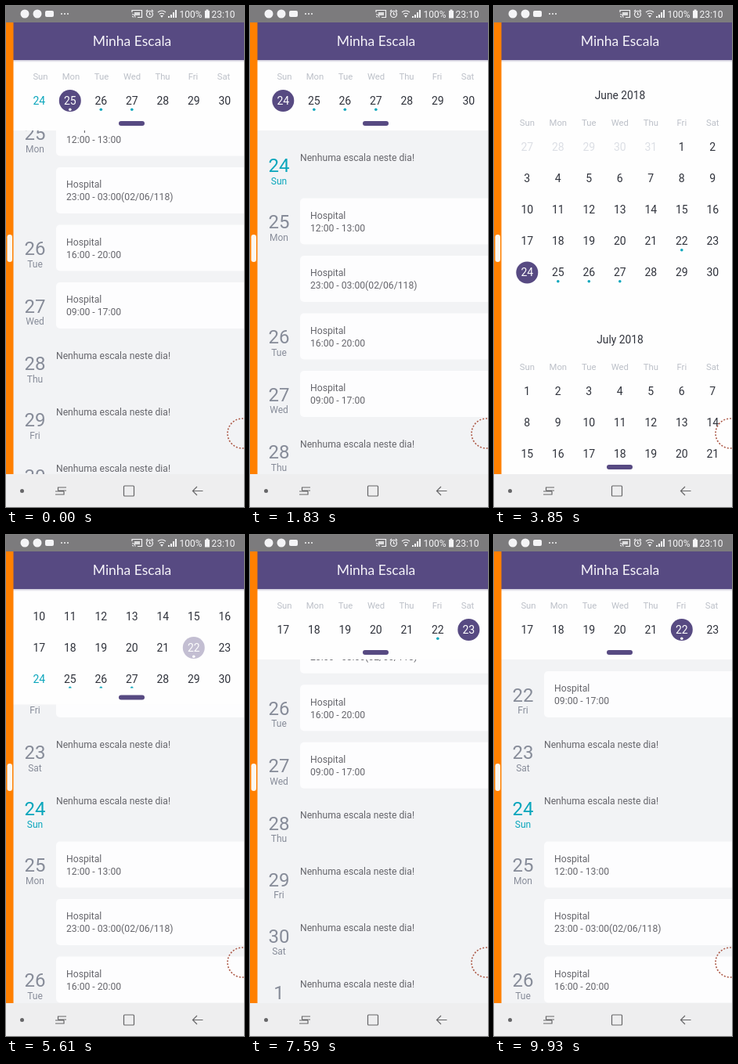
These frames come from a looping animation (304 by 640 pixels, 9.98 s). An HTML page:

```html
<!DOCTYPE html>
<html lang="pt">
<head>
<meta charset="utf-8">
<title>Minha Escala</title>
<style>
html, body { margin: 0; width: 100%; height: 100%; overflow: hidden; background: #f2f3f5; }
svg { display: block; width: 304px; height: 640px; font-family: Roboto, "Noto Sans", sans-serif; }
.icon { fill: none; stroke: #f4f4f6; stroke-width: 1.2; }
.nav { fill: none; stroke: #666668; stroke-width: 1.2; }
</style>
</head>
<body>
<svg id="stage" viewBox="0 0 304 640" xmlns="http://www.w3.org/2000/svg">
  <defs>
    <clipPath id="calendarClip"><rect id="clipRect" x="9" y="69" width="295" height="69"/></clipPath>
    <linearGradient id="shade" x2="0" y2="1">
      <stop stop-color="#574a82" stop-opacity=".3"/>
      <stop offset="1" stop-color="#574a82" stop-opacity="0"/>
    </linearGradient>
  </defs>
  <rect width="304" height="640" fill="#f2f3f5"/>
  <g id="list"></g>
  <rect id="panel" x="9" y="69" width="295" height="90" fill="#fefefe"/>
  <g clip-path="url(#calendarClip)"><g id="calendar"></g></g>
  <g id="weekdays"><rect x="9" y="69" width="295" height="34" fill="#fefefe"/></g>
  <rect id="knob" x="144" width="33" height="6" rx="3" fill="#574a82"/>
  <circle cx="302" cy="546" r="19" fill="none" stroke="#b0604f" stroke-width="1.700" stroke-dasharray="2 2"/>

  <rect x="9" y="69" width="295" height="3" fill="url(#shade)"/>
  <rect y="21" width="304" height="48" fill="#574a82"/>
  <rect y="21" width="9.5" height="577" fill="#ff8000"/>
  <rect x="1.5" y="292" width="6.5" height="35" rx="3.2" fill="#fbf6ee"/>

  <rect width="304" height="21" fill="#7c7b7d"/>
  <g id="status" fill="#f4f4f6">
    <circle cx="24" cy="10" r="5.5"/>
    <circle cx="40" cy="10" r="5.5"/>
    <rect x="50" y="6" width="11" height="8" rx="2"/>
    <circle cx="71" cy="10" r="1"/><circle cx="75" cy="10" r="1"/><circle cx="79" cy="10" r="1"/>
    <path class="icon" d="M161 8V5.500H173.500V14.500H168M161 10.500A4 4 0 0 1 165 14.500M161 13A1.500 1.500 0 0 1 162.500 14.500"/>
    <rect x="164" y="8" width="7" height="4" opacity=".8"/>
    <circle class="icon" cx="183.500" cy="10.500" r="4"/>
    <path class="icon" d="M183.500 8V11H185.500M179 7L181 5M188 7L186 5"/>
    <path class="icon" d="M194 8Q199 4 204 8M196 10.500Q199 8 202 10.500"/>
    <path d="M197 12H201L199 15ZM207 15H209V13H207ZM210 15H212V11H210ZM213 15H215V8H213ZM216 15H218V5H216Z"/>
    <path d="M254 6H255.500V4.500H258.500V6H260V15.500H254Z"/>
  </g>

  <rect y="598" width="304" height="42" fill="#eeeeef"/>
  <circle cx="20.500" cy="619.500" r="2.500" fill="#666668"/>
  <path class="nav" d="M77 615H66.500V619M63 624H74V620M66.500 619H77M63 620H74"/>
  <rect class="nav" x="150.500" y="613" width="13" height="13" rx="1"/>
  <path class="nav" d="M251.500 619.500H238.500M244 614L238.500 619.500L244 625"/>
</svg>
<script>
const LOOP = 9980;
const COLOR = { plum: '#574a82', today: '#0aa6bc', day: '#30333c', muted: '#bcc0c8', old: '#dcdfe5',
  number: '#878c99', body: '#66666c' };
const WEEKDAYS = ['Sun', 'Mon', 'Tue', 'Wed', 'Thu', 'Fri', 'Sat'];
const MARKED = [22, 25, 26, 27];
const ROW = 40;
const $ = id => document.getElementById(id);

function add(parent, tag, attrs, content = '') {
  const el = document.createElementNS('http://www.w3.org/2000/svg', tag);
  for (const key in attrs) el.setAttribute(key, attrs[key]);
  el.textContent = content;
  return parent.appendChild(el);
}

// y is the middle of the capital letters
function label(parent, text, x, y, size, fill, anchor = 'middle', extra = {}) {
  return add(parent, 'text', { x, y: y + size * 0.355, 'font-size': size, fill, 'text-anchor': anchor, ...extra }, text);
}

const columnX = col => 42.3 + col * 39.5;

// Agenda rows: y is the middle of the big day number
function buildList() {
  const shifts = {
    22: ['09:00 - 17:00'],
    25: ['12:00 - 13:00', '23:00 - 03:00(02/06/118)'],
    26: ['16:00 - 20:00'],
    27: ['09:00 - 17:00']
  };
  const list = $('list');
  let y = 204;
  for (let i = 0; i < 13; i++) {
    const date = 22 + i, day = date > 30 ? date - 30 : date;
    const fill = date === 24 ? COLOR.today : COLOR.number;
    label(list, day, 37, y, 24, fill);
    label(list, WEEKDAYS[(i + 5) % 7], 37, y + 20, 12, fill);
    if (!shifts[date]) {
      label(list, 'Nenhuma escala neste dia!', 64, y - 10, 12.15, COLOR.body, 'start');
      y += 72;
      continue;
    }
    for (const hours of shifts[date]) {
      add(list, 'rect', { x: 64, y: y - 30, width: 250, height: 59, rx: 5, fill: '#fdfdfe' });
      label(list, 'Hospital', 77, y - 8, 12.2, COLOR.body, 'start');
      label(list, hours, 77, y + 8, 12.2, COLOR.body, 'start', { style: 'font-kerning: none' });
      y += 73.5;
    }
  }
}

// Calendar coordinates: the first week of June lies at y = 0
const juneDays = [];
function monthHead(title, y) {
  const calendar = $('calendar');
  label(calendar, title, 161, y - 66, 13.8, COLOR.day);
  WEEKDAYS.forEach((name, col) => label(calendar, name, columnX(col), y - 32, 11.3, COLOR.muted));
}

function buildCalendar() {
  const calendar = $('calendar'), julyY = 4 * ROW + 152;
  monthHead('June 2018', 0);
  monthHead('July 2018', julyY);
  for (let i = 0; i < 35; i++) {
    const day = i - 4, x = columnX(i % 7), y = Math.floor(i / 7) * ROW;
    if (i < 28) label(calendar, i + 1, x, julyY + y, 14, COLOR.day);
    if (day < 1) {
      label(calendar, day + 31, x, y, 14, COLOR.old);
      continue;
    }
    const group = add(calendar, 'g', {});
    const disc = add(group, 'circle', { cx: x, cy: y, r: 14, fill: COLOR.plum });
    const text = label(group, day, x, y, 14, COLOR.day);
    const dot = MARKED.includes(day) ? add(group, 'circle', { cx: x, cy: y + 11.3, r: 1.8 }) : null;
    juneDays.push({ day, group, disc, text, dot });
  }
}

// Monotone curve through [time, value] points
function curve(points) {
  const slope = i => (points[i + 1][1] - points[i][1]) / (points[i + 1][0] - points[i][0]);
  const tangent = i => {
    if (i === 0 || i === points.length - 1) return 0;
    const a = slope(i - 1), b = slope(i);
    return a * b > 0 ? 2 * a * b / (a + b) : 0;
  };
  return t => {
    if (t <= points[0][0]) return points[0][1];
    const i = points.findIndex(p => p[0] > t) - 1;
    if (i < 0) return points[points.length - 1][1];
    const [t0, v0] = points[i], [t1, v1] = points[i + 1];
    const h = t1 - t0, u = (t - t0) / h, w = 1 - u;
    return v0 * (1 + 2 * u) * w * w + v1 * u * u * (3 - 2 * u)
      + h * u * w * (tangent(i) * w - tangent(i + 1) * u);
  };
}

const scrollAt = curve([[0, 259], [300, 300], [800, 225], [1400, 146], [5609, 146], [5610, 0],
  [7150, 0], [7590, 347], [7850, 400], [8240, 200], [8700, 40], [9100, 0]]);
const openAt = curve([[1950, 0], [2800, 354], [3200, 439], [5609, 439], [5610, 58], [5870, 0]]);
const pressAt = curve([[5200, 1], [5270, 0.35], [5610, 0.35], [5800, 1]]);
const gripAt = curve([[1900, 1], [2050, 0.5], [3100, 0.5], [3250, 1]]);
const SELECTED = [[0, 25], [1050, 24], [5610, 22], [7450, 23], [7640, 25], [7880, 26],
  [8400, 25], [8620, 24], [8850, 23], [9100, 22]];

function render(t) {
  const open = openAt(t);
  const selected = SELECTED.filter(s => s[0] <= t).pop()[1];
  const week = Math.floor((selected + 4) / 7);
  const firstRow = 121 + open * (week + 1) / 10 - week * ROW;

  $('list').setAttribute('transform', `translate(0 ${-scrollAt(t)})`);
  $('calendar').setAttribute('transform', `translate(0 ${firstRow})`);
  $('panel').setAttribute('height', 90 + open);
  $('clipRect').setAttribute('height', 69 + open);
  $('weekdays').setAttribute('transform', `translate(0 ${-open})`);
  $('weekdays').setAttribute('opacity', Math.max(0, 1 - open / 90));
  $('knob').setAttribute('y', 147 + open);
  $('knob').setAttribute('opacity', gripAt(t));

  for (const { day, group, disc, text, dot } of juneDays) {
    const on = day === selected;
    disc.setAttribute('visibility', on ? 'visible' : 'hidden');
    text.setAttribute('fill', on ? '#fff' : day === 24 ? COLOR.today : COLOR.day);
    if (dot) dot.setAttribute('fill', on ? '#fff' : COLOR.today);
    if (day === 22) group.setAttribute('opacity', pressAt(t));
  }
}

buildList();
buildCalendar();
WEEKDAYS.forEach((name, i) => label($('weekdays'), name, 44 + i * 39, 90, 11.3, COLOR.muted));
label($('stage'), 'Minha Escala', 161, 45, 17.5, '#f6f4fa', 'middle', { 'font-family': 'Lato, sans-serif' });
label($('status'), '100%', 236, 10.5, 12, '#f4f4f6');
label($('status'), '23:10', 277.5, 10.5, 12, '#f4f4f6');

const start = performance.now();
function tick() {
  render((performance.now() - start) % LOOP);
  requestAnimationFrame(tick);
}
tick();
</script>
</body>
</html>
```
